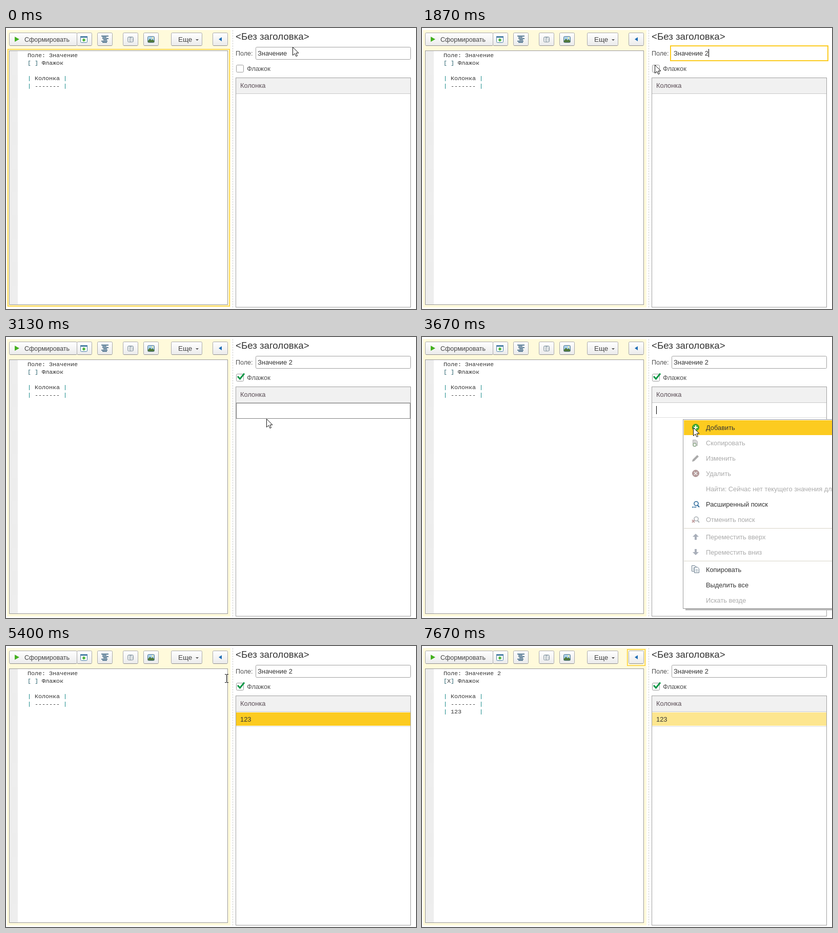
An HTML page with a canvas that plays this animation: 800 by 550 pixels, repeating every 8470 ms.

```html
<!DOCTYPE html>
<html lang="ru">
<head>
<meta charset="utf-8">
<style>
html, body { margin: 0; width: 100%; height: 100%; overflow: hidden; background: #fff; }
canvas { display: block; }
</style>
</head>
<body>
<canvas id="stage" width="800" height="550"></canvas>
<script>
const ctx = document.getElementById('stage').getContext('2d');
const LOOP = 8470, STEP = 200 / 3;
const YELLOW = '#fccb20', PALE = '#fde68f', INK = '#333', GRAY = '#a0a0a0', DIM = '#ababab';

// pointer waypoints: step, x, y
const PATH = [
  [0, 559, 37], [2, 487, 82], [4, 487, 82], [11, 581, 52], [26, 581, 52], [28, 454, 72],
  [31, 454, 72], [34, 430, 78], [37, 453, 78], [40, 456, 81], [43, 456, 81], [47, 508, 160],
  [48, 508, 160], [50, 529, 177], [73, 529, 177], [74, 531, 182], [77, 531, 182],
  [83, 394, 22], [84, 394, 22], [86, 414, 26], [108, 414, 26], [110, 438, 120], [114, 134, 535]
];

const MENU = [
  [177, 'Добавить', 1], [207, 'Скопировать'], [237, 'Изменить'], [267, 'Удалить'],
  [297, 'Найти: Сейчас нет текущего значения для поиска'], [327, 'Расширенный поиск', 1],
  [357, 'Отменить поиск'], [391, 'Переместить вверх'], [421, 'Переместить вниз'],
  [455, 'Копировать', 1], [485, 'Выделить все', 1], [515, 'Искать везде']
];

const within = (n, a, b) => n >= a && n < b;

function rect(x, y, w, h, color) {
  ctx.fillStyle = color;
  ctx.fillRect(x, y, w, h);
}

function frame(x, y, w, h, color, width = 1) {
  ctx.strokeStyle = color;
  ctx.lineWidth = width;
  ctx.strokeRect(x + width / 2, y + width / 2, w - width, h - width);
}

function rounded(x, y, w, h, stroke, fill) {
  ctx.beginPath();
  ctx.roundRect(x + .5, y + .5, w - 1, h - 1, 2);
  ctx.fillStyle = fill;
  ctx.fill();
  ctx.strokeStyle = stroke;
  ctx.lineWidth = 1;
  ctx.stroke();
}

function shape(points, fill, stroke, width = 1) {
  ctx.beginPath();
  points.forEach(([x, y]) => ctx.lineTo(x, y));
  if (fill) { ctx.closePath(); ctx.fillStyle = fill; ctx.fill(); }
  if (stroke) { ctx.strokeStyle = stroke; ctx.lineWidth = width; ctx.stroke(); }
}

function disc(x, y, r, fill, stroke, width = 1) {
  ctx.beginPath();
  ctx.arc(x, y, r, 0, 7);
  if (fill) { ctx.fillStyle = fill; ctx.fill(); }
  if (stroke) { ctx.strokeStyle = stroke; ctx.lineWidth = width; ctx.stroke(); }
}

function text(s, x, y, color = INK, size = 12.9) {
  ctx.font = `${size}px "Liberation Sans", Arial, sans-serif`;
  ctx.fillStyle = color;
  ctx.fillText(s, x, y);
  return x + ctx.measureText(s).width;
}

function plus(x, y, r, color) {
  rect(x - r, y - 1, 2 * r, 2, color);
  rect(x - 1, y - r, 2, 2 * r, color);
}

function focusRing(x, y, w, h) {
  frame(x, y, w, h, YELLOW);
  frame(x + 1, y + 1, w - 2, h - 2, '#fde893');
}

function button(x, w, pressed) {
  const fill = ctx.createLinearGradient(0, 9, 0, 35);
  fill.addColorStop(0, pressed ? '#cfcfcf' : '#fff');
  fill.addColorStop(1, pressed ? '#e4e4e4' : '#ebebeb');
  rounded(x, 9, w, 26, pressed ? '#777' : '#aaa', fill);
  rect(x + 2, 34, w - 4, 1, '#8e8e8e');
}

const gutter = (() => {
  const tile = document.createElement('canvas');
  tile.width = tile.height = 2;
  const c = tile.getContext('2d');
  c.fillStyle = '#fff';
  c.fillRect(0, 0, 2, 2);
  c.fillStyle = '#dcdcdc';
  c.fillRect(0, 0, 1, 1);
  c.fillRect(1, 1, 1, 1);
  return ctx.createPattern(tile, 'repeat');
})();

function toolbar(n) {
  button(6, 133);
  button(138, 30);
  [178, 228, 268].forEach(x => button(x, 30));
  button(322, 61);
  button(403, 30, within(n, 90, 96));

  shape([[17, 17], [26, 22], [17, 27]], '#43b01e');
  text('Сформировать', 36, 27, '#444', 12.5);
  rounded(145, 16, 14, 13, '#4b7fa5', '#fff');
  rect(145, 16, 14, 3, '#4b7fa5');
  plus(152, 23.5, 3, '#2fa81d');
  [[186, 14], [188, 8], [188, 12], [190, 7], [186, 12], [188, 9]].forEach(([x, w], i) =>
    rect(x, 15 + i * 2.5, w, 1.4, '#1f4e70'));
  rounded(237, 17, 12, 11, '#7f8e98', '#fff');
  rect(238, 18, 10, 2, '#c8d3da');
  rect(242.5, 17, 1, 11, '#7f8e98');
  [21, 23, 25].forEach(y => { rect(239, y, 3, 1, '#a9b4ba'); rect(245, y, 3, 1, '#a9b4ba'); });
  rounded(276, 16, 14, 13, '#58798b', '#a9d2ee');
  disc(286, 19.5, 1.5, '#fff3a0');
  shape([[277, 28], [277, 25], [281, 21], [284, 24], [286, 22], [289, 25], [289, 28]], '#50793c');
  text('Еще', 336, 27, '#444', 13.4);
  shape([[370, 22], [376, 22], [373, 25]], '#555');
  shape([[415, 22], [421, 18], [421, 26]], '#1d6db5');
  if (n >= 90) focusRing(400, 6, 36, 33);
}

function code(line, x, y) {
  ctx.font = '11.67px "Liberation Mono", "Courier New", monospace';
  [...line].forEach((ch, i) => {
    ctx.fillStyle = ch === '|' ? '#108585' : '[]'.includes(ch) ? '#245f6c' : '#333';
    ctx.fillText(ch, x + i * 7, y);
  });
}

function editor(n) {
  rect(2, 4, 436, 543, '#fffadb');
  if (n < 12) focusRing(3, 41, 434, 504);
  rect(6, 44, 427, 498, '#fff');
  rect(7, 45, 16, 496, gutter);
  frame(6, 44, 427, 498, '#999');
  const done = n >= 96;
  const lines = [done ? 'Поле: Значение 2' : 'Поле: Значение', done ? '[X] Флажок' : '[ ] Флажок',
    '', '| Колонка |', '| ------- |'];
  if (done) lines.push('| 123     |');
  lines.forEach((line, i) => code(line, 42, 57 + i * 15));
  toolbar(n);
  for (let y = 4; y < 547; y += 5) rect(442, y, 1, 3, '#cfcfcf');
}

function form(n) {
  text('<Без заголовка>', 448, 23, INK, 18.7);
  text('Поле:', 448, 54, '#505050', 12.5);
  const focused = within(n, 12, 36);
  if (focused) {
    rect(484, 34, 309, 31, '#fff');
    frame(484, 34, 309, 31, YELLOW, 2);
  } else rounded(487, 37, 303, 25, GRAY, '#fff');
  if (within(n, 13, 16)) rect(491, 41, 58, 16, PALE);
  const value = 'Значение' + (n >= 22 ? ' ' : '') + (n >= 24 ? '2' : '');
  const end = text(value, 491, 54);
  if (focused) rect(Math.round(end), 41, 1, 16, '#000');

  rounded(449, 72, 15, 15, '#999', '#fff');
  if (within(n, 36, 47)) focusRing(445, 68, 23, 23);
  if (n >= 38) shape([[452, 77], [456.5, 82], [465, 71.5]], null, '#0b9746', 3);
  text('Флажок', 470, 84, '#505050', 13);
}

function table(n) {
  frame(448, 97, 342, 450, GRAY);
  rect(449, 98, 340, 30, '#f1f1f1');
  rect(449, 128, 340, 1, '#c9c9c9');
  text('Колонка', 457, 117, '#5a4d55');
  if (within(n, 47, 55)) {
    ctx.setLineDash([1, 1]);
    frame(449, 129, 340, 31, '#000');
    ctx.setLineDash([]);
  }
  if (n < 55) return;
  if (n >= 78) rect(449, 130, 340, 26, n < 90 ? YELLOW : PALE);
  rect(449, 157, 340, 1, '#dedede');
  const typed = '123'.slice(0, Math.max(0, Math.floor((n - 64) / 2)));
  const end = text(typed, 457, 148);
  if (n < 78 && !within(n, 64, 66)) rect(Math.round(end), 135, 1, 16, '#000');
}

function magnifier(y, color) {
  disc(535, y - 1, 4, '#fff', color, 1.6);
  shape([[537.5, y + 2], [541, y + 6]], null, color, 2);
}

function sheet(x, y, stroke, fill) {
  shape([[x, y], [x + 6, y], [x + 9, y + 3], [x + 9, y + 11], [x, y + 11], [x, y]], fill, stroke);
}

function menuIcons() {
  disc(534, 177, 6.5, '#45b035', '#2d8b28');
  plus(534, 177, 4, '#fff');
  sheet(528.5, 201.5, '#b4b4b4', '#d6d6d6');
  disc(532, 211, 4, '#a3b8a0');
  plus(532, 211, 2, '#fff');
  shape([[527, 244], [528, 240], [537, 231], [540, 234], [531, 243]], '#aaa');
  disc(534, 267, 6.5, '#b79c9c', '#a88f8f');
  shape([[531, 264], [537, 270]], null, '#eee', 1.6);
  shape([[537, 264], [531, 270]], null, '#eee', 1.6);
  magnifier(327, '#2c6a9c');
  [527, 530, 533].forEach(x => rect(x, 332, 2, 2, '#2c6a9c'));
  magnifier(357, '#adb3b7');
  shape([[527, 358], [532, 363]], null, '#c2a0a0', 2);
  shape([[532, 358], [527, 363]], null, '#c2a0a0', 2);
  [[391, 1], [421, -1]].forEach(([y, d]) => {
    shape([[534, y - 6 * d], [540, y], [528, y]], '#a9afba');
    rect(532, Math.min(y, y + 6 * d), 4, 6, '#a9afba');
  });
  [[526.5, 447.5], [531.5, 450.5]].forEach(([x, y]) => {
    sheet(x, y, '#65798a', '#fff');
    [4, 6, 8].forEach(d => rect(x + 2, y + d, 5, 1, '#9aabb8'));
  });
}

function menu(n) {
  if (!within(n, 48, 56)) return;
  rect(514, 532, 286, 3, '#b9b9b9');
  rect(509, 161, 300, 371, '#fff');
  frame(509, 161, 300, 371, '#999');
  if (n >= 49) rect(511, 163, 289, 29, YELLOW);
  rect(511, 374, 289, 1, '#d8d4c8');
  rect(511, 438, 289, 1, '#d8d4c8');
  MENU.forEach(([y, label, enabled]) => text(label, 554, y + 5, enabled ? INK : DIM, 12.85));
  menuIcons();
}

function pointerAt(n) {
  const i = PATH.findIndex(key => key[0] > n);
  if (i < 0) return PATH[PATH.length - 1].slice(1);
  const [a, x0, y0] = PATH[i - 1], [b, x1, y1] = PATH[i];
  const k = (n - a) / (b - a), e = k * k * (3 - 2 * k);
  return [Math.round(x0 + (x1 - x0) * e), Math.round(y0 + (y1 - y0) * e)];
}

function pointer(n) {
  if (within(n, 22, 27) || within(n, 66, 74) || n >= 115) return;
  const [x, y] = pointerAt(n);
  const overField = x > 487 && y > 38 && y < 62;
  const overEditor = x > 23 && x < 432 && y > 45 && y < 541;
  if (overField || overEditor) {
    rect(x, y - 7, 1, 15, '#000');
    [-8, 8].forEach(d => { rect(x - 3, y + d, 3, 1, '#000'); rect(x + 1, y + d, 3, 1, '#000'); });
    return;
  }
  const outline = [[0, 0], [0, 16], [4, 12.5], [6.5, 18], [9, 17], [6.5, 11.5], [11.5, 11.5], [0, 0]];
  shape(outline.map(([dx, dy]) => [x + dx + .5, y + dy + .5]), '#fff', '#111');
}

function draw(now) {
  const n = Math.floor((now % LOOP + 4) / STEP);
  rect(0, 0, 800, 550, '#fff');
  editor(n);
  form(n);
  table(n);
  menu(n);
  pointer(n);
}

let start;
function tick(now) {
  start ??= now;
  draw(now - start);
  requestAnimationFrame(tick);
}
draw(0);
requestAnimationFrame(tick);
</script>
</body>
</html>
```
